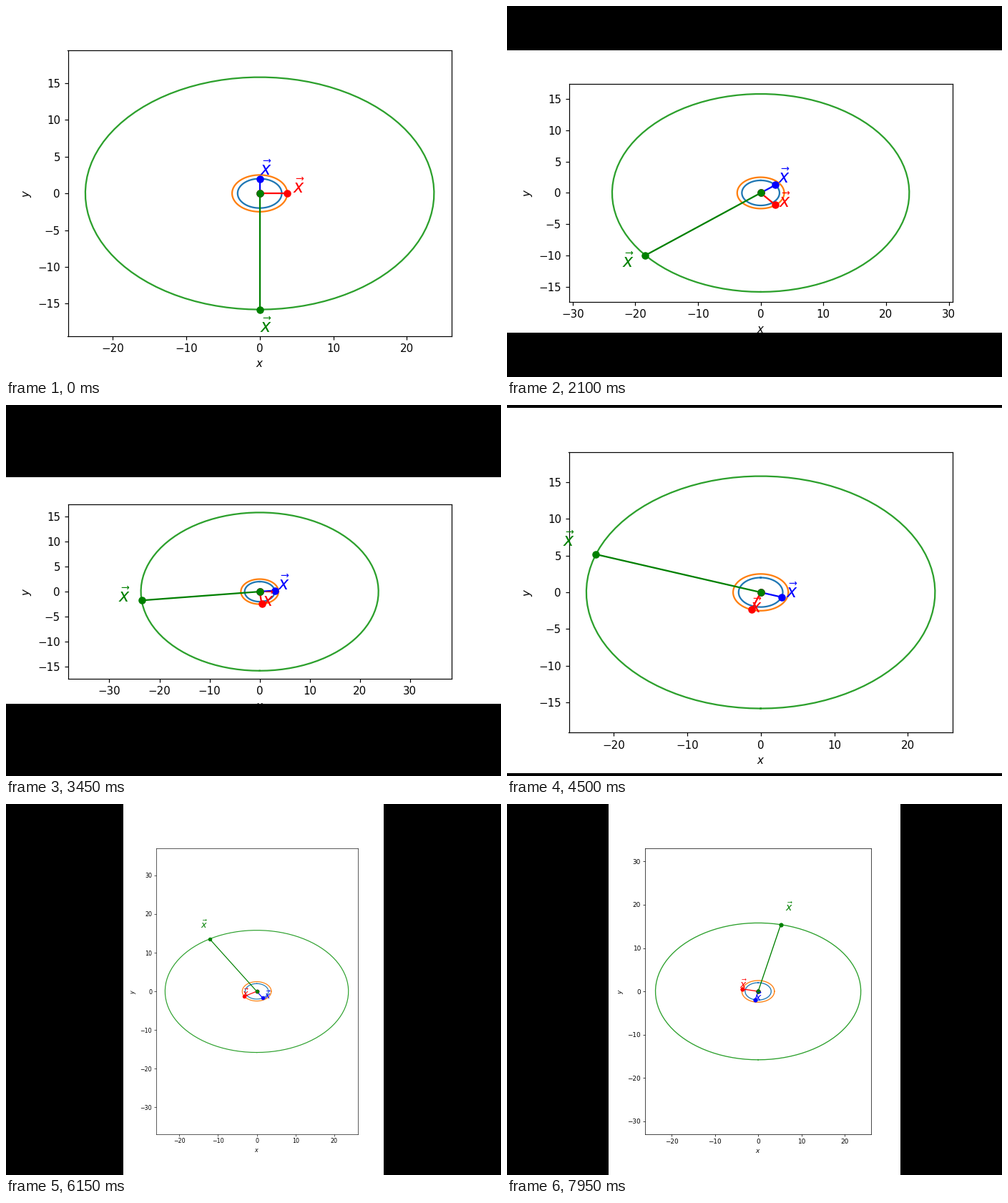
Write a matplotlib script that moves like this. It is 692 by 519 pixels and loops after 8 s.

```python
import numpy as np
import matplotlib.pyplot as plt
from matplotlib.animation import FuncAnimation
from matplotlib.patches import Rectangle

STAGE_W, STAGE_H, DPI = 692, 519, 64
WINDOW_W = 640                  # plot window width; its height shrinks over time
SHRINK = 8.15                   # window pixels lost per step
TURN = 2 * np.pi / 99           # radians per step
HOLD = 3                        # animation frames per step
A, B = 23.7, 15.8               # half axes of the widest orbit

# colour, orbit as a function of the angle
VECTORS = [
    ("b", lambda a: (3 * np.sin(a), 2 * np.cos(a))),
    ("r", lambda a: (3.75 * np.cos(a), -2.5 * np.sin(a))),
    ("g", lambda a: (-A * np.sin(a), -B * np.cos(a))),
]

plt.rcParams["font.family"] = "DejaVu Sans"
fig = plt.figure(figsize=(STAGE_W / DPI, STAGE_H / DPI), dpi=DPI, facecolor="white")
ax = fig.add_axes([0.125, 0.11, 0.775, 0.77])
ax.set_xlabel("$x$")
ax.set_ylabel("$y$")

angles = np.linspace(0, 2 * np.pi, 100)
orbits = [ax.plot(*orbit(angles))[0] for _, orbit in VECTORS]
arrows = [ax.plot([], [], color + "o-")[0] for color, _ in VECTORS]
labels = [ax.text(0, 0, r"$\vec{x}$", color=color) for color, _ in VECTORS]
bars = [fig.add_artist(Rectangle((0, 0), 0, 0, color="black", lw=0, zorder=10))
        for _ in range(4)]


def window_height(step):
    """Steady shrinking, with two sudden enlargements."""
    if step < 27:
        return 480 - SHRINK * step
    if step < 38:
        return 471.8 + SHRINK * (30 - step)
    return 815 + SHRINK * (53 - step)


def set_sizes(s):
    """Scale every point size of the plot by s."""
    ax.tick_params(labelsize=10 * s, length=3.5 * s, width=0.8 * s, pad=3.5 * s)
    for axis in (ax.xaxis, ax.yaxis):
        axis.label.set_fontsize(10 * s)
        axis.labelpad = 4 * s
    for spine in ax.spines.values():
        spine.set_linewidth(0.8 * s)
    for line in orbits + arrows:
        line.set_linewidth(1.5 * s)
        line.set_markersize(6 * s)
        line.set_markeredgewidth(s)
    for label in labels:
        label.set_fontsize(16 * s)


def fit_window(height):
    """Fit the window into the stage, with black bars around it."""
    zoom = min(STAGE_W / WINDOW_W, STAGE_H / height)
    w, h = WINDOW_W * zoom, height * zoom
    left, low = (STAGE_W - w) / 2, (STAGE_H - h) / 2
    ax.set_position([(left + 0.125 * w) / STAGE_W, (low + 0.11 * h) / STAGE_H,
                     0.775 * w / STAGE_W, 0.77 * h / STAGE_H])

    # equal aspect: widen the limits of the roomier direction
    unit = min(0.775 * w / (2.2 * A), 0.77 * h / (2.2 * B))
    x_max, y_max = 0.775 * w / unit / 2, 0.77 * h / unit / 2
    ax.set_xlim(-x_max, x_max)
    ax.set_ylim(-y_max, y_max)

    bx, by = round(left) / STAGE_W, round(low) / STAGE_H
    for bar, box in zip(bars, [(0, 0, bx, 1), (1 - bx, 0, bx, 1),
                               (0, 0, 1, by), (0, 1 - by, 1, by)]):
        bar.set_bounds(*box)
        bar.set_visible(box[2] > 0 and box[3] > 0)
    set_sizes(zoom * 100 / DPI)


def update(frame):
    step = frame // HOLD
    fit_window(window_height(step))
    for (_, orbit), arrow, label in zip(VECTORS, arrows, labels):
        x, y = orbit(TURN * step)
        arrow.set_data([0, x], [0, y])
        label.set_position((1.2 * x, 1.2 * y))
    return orbits + arrows + labels + bars


anim = FuncAnimation(fig, update, frames=160, interval=50, repeat=True,
                     repeat_delay=0, blit=False)
plt.show()
```
